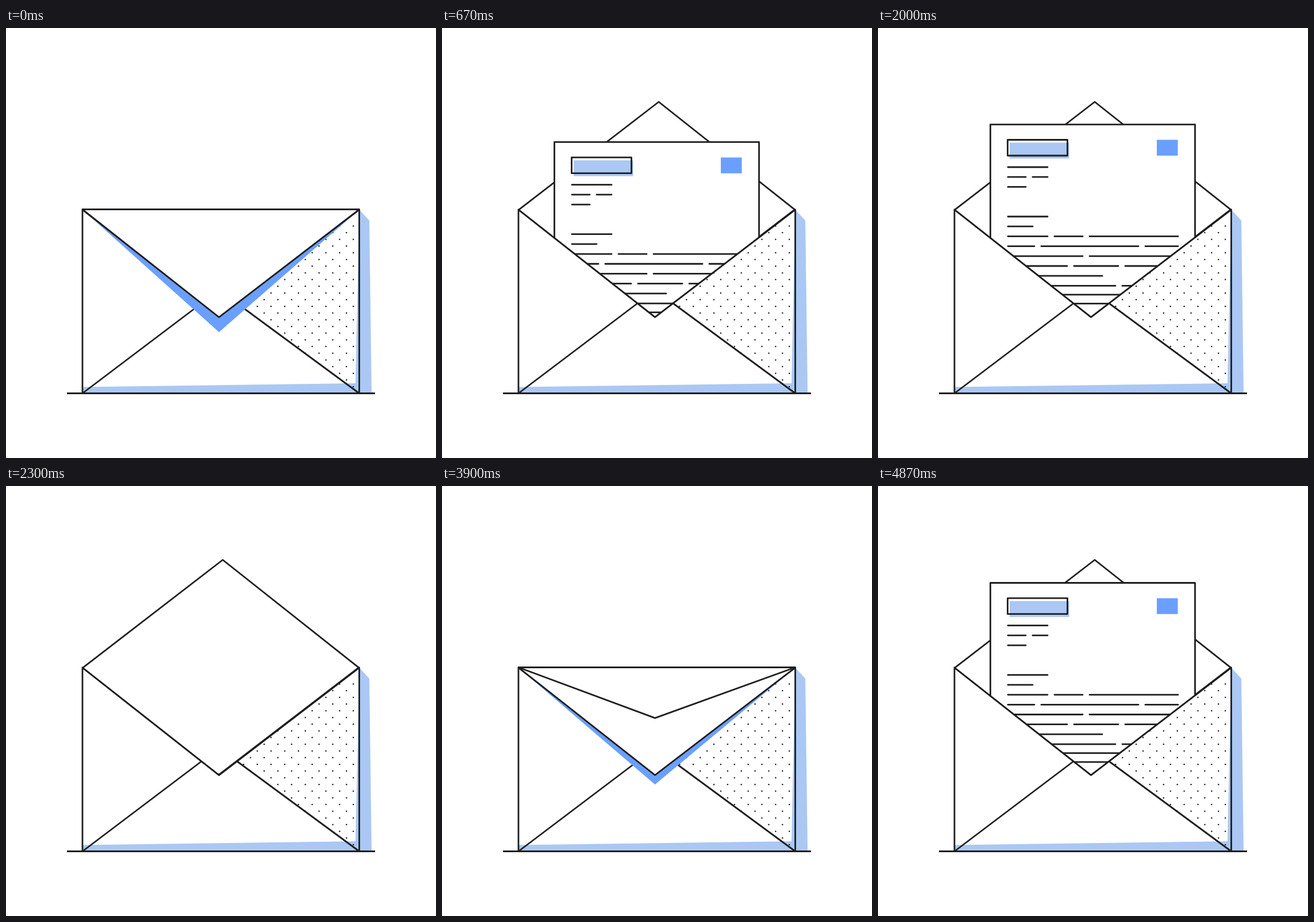
Animation, 748 px wide and 748 px high, one loop 5.16 s. Source, as an HTML page with a canvas:

```html
<!DOCTYPE html>
<html lang="en">
<head>
<meta charset="utf-8">
<title>Envelope</title>
<style>
html, body { margin: 0; width: 100%; height: 100%; overflow: hidden; background: #fff; }
canvas { display: block; }
</style>
</head>
<body>
<canvas id="stage" width="748" height="748"></canvas>
<script>
const ctx = document.getElementById('stage').getContext('2d');
const INK = '#1e1e1e', BLUE = '#6b9fff', PALE = '#aac8f3';
const LOOP = 5160;
const L = 133, R = 614.5, TOP = 316, BASE = 635.5;
const LEFT = [L, TOP], RIGHT = [R, TOP], TIP = [370.5, 503];
const HIDDEN = 560, PEAK = 148.2, REST = 168.5;

// Each row of writing: where it ends, then the middles of its word gaps
const MARGIN = 226, EDGE = 522;
const ROWS = [
  [295], [295, 263], [257], [], [], [295], [269],
  [EDGE, 301, 362], [EDGE, 278, 459], [EDGE, 362], [EDGE, 335, 424],
  [390], [EDGE, 419], [EDGE], [EDGE]
];

const clamp = u => Math.max(0, Math.min(1, u));
const easeOut = u => 1 - (1 - u) ** 2;
const easeInOut = u => u < .5 ? 2 * u * u : 1 - 2 * (1 - u) ** 2;
const tween = (a, b, f, start, end) => a + (b - a) * easeInOut(clamp((f - start) / (end - start)));

function path(points, fill, stroke, closed) {
  ctx.beginPath();
  points.forEach(p => ctx.lineTo(...p));
  if (closed) ctx.closePath();
  if (fill) { ctx.fillStyle = fill; ctx.fill(); }
  if (stroke) { ctx.strokeStyle = stroke; ctx.stroke(); }
}

function box(x, y, w, h, fill, stroke) {
  path([[x, y], [x + w, y], [x + w, y + h], [x, y + h]], fill, stroke, true);
}

// Flap openness (0..1) and y of the letter's top edge
function pose(f) {
  if (f >= 60 && f < 117)
    return { open: tween(1, 0, f, 69, 81), top: tween(REST - .7, HIDDEN, f, 61, 72) };
  const d = f - (f < 60 ? 2 : 117);
  return {
    open: easeOut(clamp((d + 1) / 7)),
    top: d < 22 ? tween(HIDDEN, PEAK, d, 5.65, 22.05) : tween(PEAK, REST, d, 22.05, 28.7)
  };
}

function drawWriting(top) {
  ctx.lineCap = 'round';
  ROWS.forEach(([end, ...gaps], i) => {
    const y = top + 74.2 + 17.2 * i - 1.7 * Math.max(0, i - 12);
    let x = MARGIN;
    for (const gap of gaps) {
      path([[x, y], [gap - 6, y]], null, INK);
      x = gap + 6;
    }
    if (end) path([[x, y], [end, y]], null, INK);
  });
  ctx.lineCap = 'butt';
}

function drawLetter(top) {
  ctx.save();
  path([[L, 0], [R, 0], RIGHT, TIP, LEFT]);
  ctx.clip();
  box(195.5, top, 356, 450, '#fff', INK);
  box(229, top + 31.7, 103.5, 27.5, PALE);
  box(225.5, top + 26.7, 104, 27.5, null, INK);
  box(485, top + 26.7, 36.5, 27.5, BLUE);
  drawWriting(top);
  ctx.restore();
}

function drawDots() {
  ctx.fillStyle = INK;
  for (let row = 0; row < 25; row++)
    for (let col = row % 2; col < 17; col += 2) {
      const x = 604.2 - 11.93 * col, y = 344.4 + 11.65 * row;
      const upper = TOP + (R - x) * .766, lower = BASE - (R - x) * .737;
      if (y < upper || y > lower + 1) continue;
      ctx.beginPath();
      ctx.arc(x, y, 1.25, 0, 7);
      ctx.fill();
    }
}

function drawFront() {
  path([LEFT, TIP, RIGHT, [R, BASE], [L, BASE]], '#fff');
  path([[L, 624.5], [608, 618], RIGHT, [632, 335], [636, BASE], [L, BASE]], PALE);
  drawDots();
  path([[L, BASE], [340, 479]], null, INK);
  path([[402, 479], [R, BASE]], null, INK);
  path([[L, BASE], LEFT, TIP, RIGHT, [R, BASE]], null, INK);
}

function drawBack(flapY) {
  path([[L, TOP + .6], [377, flapY], [R, TOP + .6]], '#fff', INK);
  path([[TIP[0], TIP[1] - 1], [R, TOP - 1]], null, INK);
}

function draw(f) {
  const { open, top } = pose(f);
  const flapY = 503 - 374.5 * open, raised = flapY < TOP;
  ctx.fillStyle = '#fff';
  ctx.fillRect(0, 0, 748, 748);
  ctx.lineWidth = 2.8;
  ctx.lineJoin = 'round';

  if (raised) drawBack(flapY);
  drawLetter(top);
  drawFront();

  const shade = 26 * Math.max(0, 1 - open * 1.43);
  path([LEFT, [TIP[0], TIP[1] + shade], RIGHT, TIP], BLUE);
  path([LEFT, TIP, RIGHT], null, INK);
  if (!raised) path([[L, TOP - .5], [TIP[0], flapY], [R, TOP - .5]], '#fff', INK, true);
  path([[106, BASE], [642, BASE]], null, INK);
}

// Motion runs in steps of a thirtieth of a second
function tick() {
  draw(Math.floor(performance.now() % LOOP * .03 + .15));
  requestAnimationFrame(tick);
}
tick();
</script>
</body>
</html>
```
